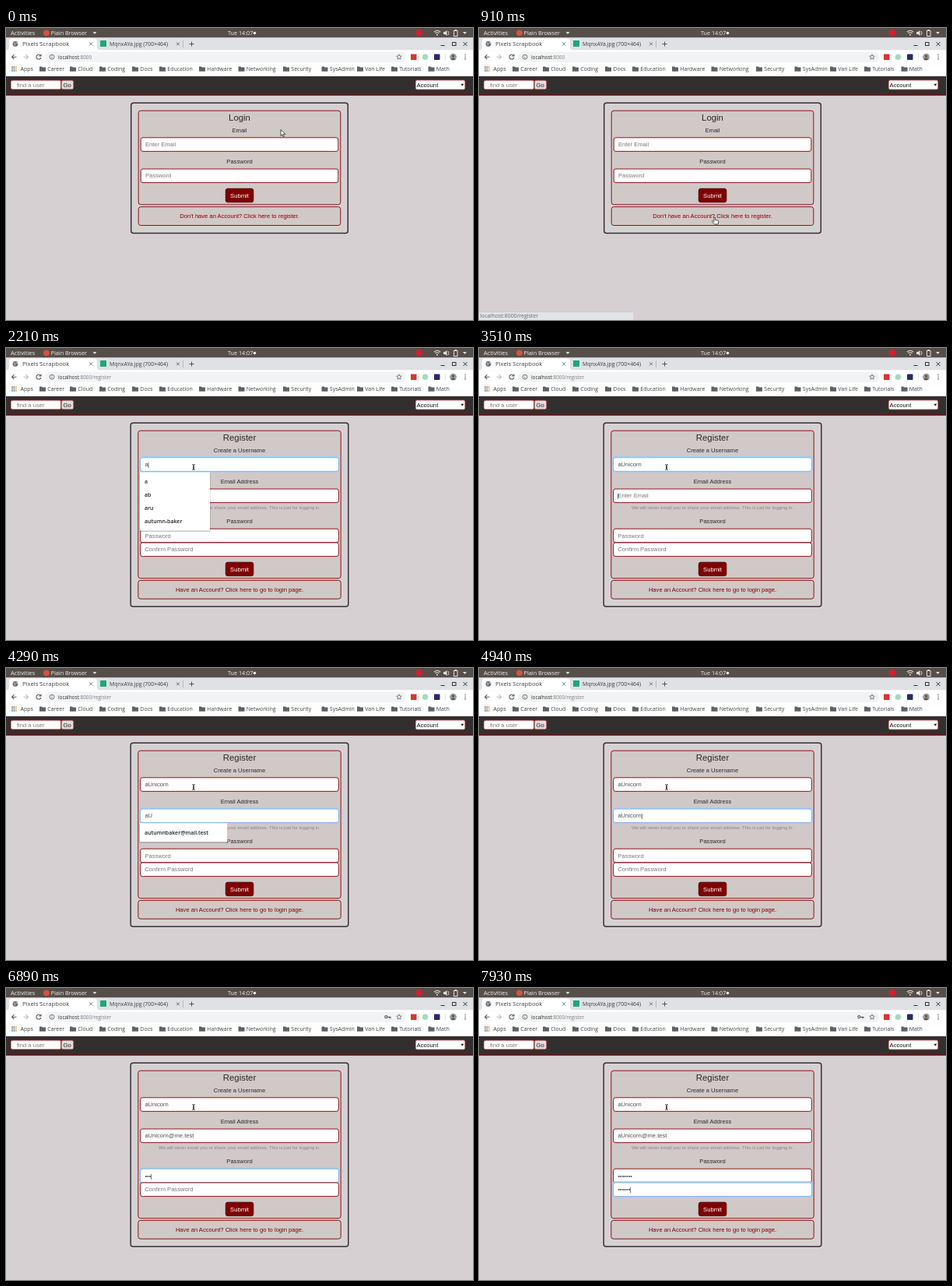
These frames come from a looping animation (600x375 px, 8000 ms). An HTML page:

```html
<!DOCTYPE html>
<html lang="en">
<head>
<meta charset="utf-8">
<title>Registration demo</title>
<style>
  html, body { margin: 0; width: 100%; height: 100%; overflow: hidden; }
  svg { display: block; width: 100vw; height: 100vh; }
  text { font-family: "Liberation Sans", Arial, sans-serif; white-space: pre; }
  .ui { font-family: "Open Sans", "Noto Sans", sans-serif; }
  .bold { font-weight: 600; }
</style>
</head>
<body>
<svg viewBox="0 0 600 375">
  <g id="browser"></g>
  <g id="page"></g>
</svg>
<script>
const LOOP = 8000, STEP = 130;
const RED = '#8c1515', MAROON = '#800000', INK = '#2b2a2c', BODY = '#d7d0d2', PANEL = '#d1c8c8';
const USER = 'aUnicorn', EMAIL = 'aUnicorn@me.test';

const rect = (x, y, w, h, fill, extra = '') =>
  `<rect x="${x}" y="${y}" width="${w}" height="${h}" fill="${fill}" ${extra}/>`;
const circle = (x, y, r, fill, extra = '') =>
  `<circle cx="${x}" cy="${y}" r="${r}" fill="${fill}" ${extra}/>`;
const path = (d, stroke, width = 1, fill = 'none') =>
  `<path d="${d}" stroke="${stroke}" stroke-width="${width}" fill="${fill}"/>`;
const text = (x, y, size, content, fill = INK, extra = '') =>
  `<text x="${x}" y="${y}" font-size="${size}" fill="${fill}" ${extra}>${content}</text>`;
const ui = (x, y, size, content, fill = INK) => text(x, y, size, content, fill, 'class="ui"');
const centered = (y, size, content, fill) => text(300, y, size, content, fill, 'text-anchor="middle"');
const outline = (x, y, w, h, stroke, fill, width = 1, r = 3) =>
  rect(x, y, w, h, fill, `rx="${r}" stroke="${stroke}" stroke-width="${width}"`);

function systemBar() {
  return rect(0, 0, 600, 12.5, '#564f49') +
    ui(6, 9, 7.6, 'Activities', '#eee') +
    circle(52, 6.3, 3.9, '#d9503f') + ui(57.5, 9, 7.3, 'Plain Browser', '#eee') +
    path('M111.5 5h5l-2.5 3z', 'none', 0, '#ddd') +
    ui(285, 9, 7.2, 'Tue 14:07', '#eee') + circle(319.5, 6.5, 1.8, '#eee') +
    circle(531, 6.2, 4.4, '#d3202a') +
    path('M550 5q4-3.5 8 0M551.5 6.8q2.500-2 5 0', '#ddd', 1.1) + circle(554, 8.8, 1, '#ddd') +
    path('M562 5h2l2.500-2v7l-2.500-2h-2z', 'none', 0, '#ddd') + path('M568 4q2 2.500 0 5', '#ddd', .9) +
    rect(575.5, 3.5, 4.5, 7, 'none', 'stroke="#ddd"') + rect(576.5, 2, 2.5, 1.2, '#ddd') +
    path('M587 5h5l-2.500 3z', 'none', 0, '#ddd');
}

function tabStrip() {
  return rect(0, 12.5, 600, 16, '#dfe1e5') +
    path('M0 28.500q4 0 4-4v-7q0-4 4-4h105q4 0 4 4v7q0 4 4 4z', 'none', 0, '#fff') +
    circle(12, 20.4, 3.4, '#6b6e72') + path('M9.500 19l2.500 1-1 2.500M13 18l1 2 1-1', '#d8d8d8', .8) +
    ui(21, 23, 7.7, 'Pixels Scrapbook', '#3c4043') +
    path('M107 18.400l4 4m0-4l-4 4', '#5f6368', .9) +
    rect(121, 16, 8, 8, '#1fa679') +
    ui(133, 23, 6.95, 'MqnxAYa.jpg (700×464)', '#3c4043') +
    path('M219 18.400l4 4m0-4l-4 4', '#5f6368', .9) +
    path('M227.500 16v9', '#9a9da1', .6) + path('M235.500 20.500h6m-3-3v6', '#505357', 1) +
    path('M558.500 22.500h5M587.500 18l5 5m0-5l-5 5', '#333', 1) +
    rect(573.5, 18.5, 4.5, 4, 'none', 'stroke="#333"');
}

function toolbar() {
  const folders = [['Career', 43], ['Cloud', 82], ['Coding', 120], ['Docs', 162], ['Education', 197],
    ['Hardware', 248], ['Networking', 298.5], ['Security', 356], ['SysAdmin', 405.500],
    ['Van Life', 451], ['Tutorials', 495], ['Math', 542.500]];
  const dotColors = ['#e2574c', '#e2574c', '#f0b429', '#48a860', '#4a86e8', '#f0b429', '#48a860', '#4a86e8', '#f0b429'];
  const star = Array.from({ length: 10 }, (_, i) => {
    const a = -Math.PI / 2 + i * Math.PI / 5, r = i % 2 ? 1.6 : 3.5;
    return `${505 + r * Math.cos(a)} ${37.3 + r * Math.sin(a)}`;
  }).join('L');
  return rect(0, 28.5, 600, 33.5, '#fff') +
    path('M13.500 37.200h-6m3-3l-3 3 3 3', '#55585c', 1.1) +
    path('M22.500 37.200h6m-3-3l3 3-3 3', '#bbbdc0', 1.1) +
    path('M44.500 35.500a3 3 0 1 0 .4 2.500M45 33.500v2.500h-2.500', '#55585c', 1.1) +
    rect(50, 30.5, 464, 13.5, '#f1f3f4', 'rx="6.7"') +
    circle(59, 37.2, 3, 'none', 'stroke="#6b6e72" stroke-width=".9"') +
    path('M59 36.800v2M59 35.200v.8', '#6b6e72', .9) +
    path(`M${star}Z`, '#5f6368', .8) +
    rect(520, 33.5, 7.5, 7.5, '#d5372f') + circle(538.5, 37.2, 3.8, '#a9d8bd') +
    rect(550, 33.5, 7.5, 7.5, '#2b2860', 'rx="1"') + path('M564.500 33v9', '#ccc', .6) +
    circle(574.5, 37.2, 4.4, '#92a0a8') + circle(574.5, 36, 1.7, '#6d5147') +
    path('M571.500 40.300q3-4 6 0q-3 2-6 0', 'none', 0, '#6d5147') +
    [34.5, 37.2, 39.9].map(y => circle(590, y, .8, '#55585c')).join('') +
    dotColors.map((c, i) => rect(7.2 + i % 3 * 2.4, 49.3 + Math.floor(i / 3) * 2.4, 1.7, 1.7, c)).join('') +
    ui(18.5, 55.2, 7, 'Apps', '#3c4043') +
    folders.map(([name, x]) =>
      path(`M${x} 49.500h3l1 1h4v5.300h-8z`, 'none', 0, '#5f6368') + ui(x + 10.3, 55.2, 7, name, '#3c4043')).join('');
}

function navbar() {
  return rect(0, 62, 600, 313, BODY) + rect(0, 62, 600, 24, '#342f2f') + rect(0, 85.5, 600, 1.3, MAROON) +
    outline(6, 67, 65, 12, RED, '#fff', 1, 2) + text(14, 75.6, 7.6, 'find a user', '#7b7b7f') +
    outline(71, 67, 16, 12, RED, '#dedcde', 1, 2) + text(73.5, 75.8, 7.8, 'Go') +
    outline(526, 66.8, 64, 12.4, RED, '#fff', 1, 2) + text(527.5, 75.6, 7.7, 'Account', '#111') +
    path('M584.300 71.800h4l-2 2.800z', 'none', 0, '#111');
}

const submitButton = y =>
  outline(282.3, y, 35.5, 17.5, '#4c0707', MAROON, 1, 2.5) + centered(y + 11.7, 7.7, 'Submit', '#fff');

// value: typed text; underlined: spell-check mark beneath it
function field(x, y, placeholder, { value = '', focused, caret, underlined } = {}) {
  const w = 600 - 2 * x;
  const bar = caret ? '<tspan fill="#222" dx="-.6">|</tspan>' : '';
  const glow = focused ? outline(x - .5, y - .5, w + 1, 18.5, '#a9cdf0', 'none', 2.6, 3.5) : '';
  const label = value
    ? text(x + 5.7, y + 11.3, 7.6, `<tspan fill="#495057">${value}</tspan>`,
        underlined ? '#d66' : INK, underlined ? 'text-decoration="underline"' : '').replace('</text>', bar + '</text>')
    : text(x + 5.7, y + 11.3, 7.6, (bar && '<tspan fill="#222" dx="-1">|</tspan><tspan dx="-1">') + placeholder + (bar && '</tspan>'), '#737980');
  return glow + outline(x, y, w, 17.6, focused ? '#80b5ea' : RED, '#fff', 1, 2.5) + label;
}

function suggestions(y, w, h, items) {
  return rect(171.5, y + .8, w + 1, h + .7, '#000', 'opacity=".22" rx="1"') + rect(172, y, w, h, '#fff') +
    items.map((item, i) => text(178, y + 14.4 + i * 17, 7, item, '#222', 'class="ui bold"')).join('');
}

function loginPage() {
  return outline(160.7, 96.2, 278.6, 167.2, '#333', 'none', 1.5) +
    outline(170.2, 106.2, 259.6, 120.6, RED, PANEL) +
    centered(119.3, 11.4, 'Login') + centered(133.6, 7.6, 'Email') +
    field(173.2, 140.8, 'Enter Email') + centered(174, 7.6, 'Password') +
    field(173.2, 181, 'Password') + submitButton(206.3) +
    outline(170.2, 229.7, 259.6, 23.8, RED, PANEL) +
    centered(243.7, 7.6, "Don't have an Account? Click here to register.", MAROON);
}

const keys = {
  user: [2080, 2470, 2600, 2730, 2860, 2990, 3120, 3250],
  email: [3640, 3770, 4420, 4550, 4680, 4810, 4940, 4940, 5200, 5330, 5460, 5720, 5850, 6110, 6240, 6370],
  password: [6630, 6760, 6890, 7020, 7150, 7150, 7280],
  confirm: [7540, 7540, 7670, 7670, 7930, 7930]
};
const focusTimes = { user: 1820, email: 3510, password: 6500, confirm: 7410 };
const order = Object.keys(keys);

function registerPage(t) {
  const active = order.filter(name => t >= focusTimes[name]).pop();
  // The focus ring lags one step behind the caret.
  const ringed = order.filter(name => t >= focusTimes[name] + (name === 'user' ? 0 : STEP)).pop();
  const count = name => keys[name].filter(k => k <= t).length;
  const lastEvent = active && Math.max(focusTimes[active], ...keys[active].filter(k => k <= t));
  const blinkOn = Math.floor((t - lastEvent) / 500) % 2 === 0;
  const state = (name, content) => ({
    value: content.slice(0, count(name)),
    focused: name === ringed,
    caret: name === active && blinkOn,
    underlined: name === 'email' && name === active && count(name) > 8
  });
  const typedUser = count('user'), typedEmail = count('email');
  let out = outline(160.2, 96.2, 279.6, 235.8, '#333', 'none', 1.5) +
    outline(169.8, 106.2, 260.4, 189.6, RED, PANEL) +
    centered(119.3, 11.4, 'Register') + centered(133.6, 7.6, 'Create a Username') +
    field(172.700, 140.8, 'Enter Username', state('user', USER)) + centered(174, 7.6, 'Email Address') +
    field(172.700, 181, 'Enter Email', state('email', EMAIL)) +
    centered(207.2, 6, 'We will never email you or share your email address. This is just for logging in.', '#898287') +
    centered(225.2, 7.6, 'Password') +
    field(172.700, 232.2, 'Password', state('password', '•'.repeat(7))) +
    field(172.700, 250, 'Confirm Password', state('confirm', '•'.repeat(6))) + submitButton(275.2) +
    outline(169.8, 298.4, 260.4, 23.8, RED, PANEL) +
    centered(312.6, 7.6, 'Have an Account? Click here to go to login page.', MAROON);
  if (typedUser === 1) out += suggestions(159.5, 90, 75, ['a', 'ab', 'aru', 'autumn-baker']);
  if (typedUser === 2) out += suggestions(159.5, 90, 24, ['autumn-baker']);
  if (typedEmail === 1 || typedEmail === 2) out += suggestions(199.3, 112.5, 24, ['autumnbaker@mail.test']);
  if (count('password')) {
    out += circle(488.3, 37.2, 1.6, 'none', 'stroke="#55585c" stroke-width="1.1"') + path('M490 37.200h4v1.800m-1.500-1.800v1.500', '#55585c', 1.1);
  }
  return out;
}

const shapes = {
  arrow: path('M0 0v8l1.900-1.700 1.300 2.900 1.300-.6-1.300-2.800h2.600z', '#222', .8, '#fff'),
  hand: path('M-1 0q1-1 1.700 0v3l3.300.8q1 .4.8 1.500l-.8 3.200h-4.500l-3-3.300q0-1.300 1.300-.9l1.200.8z', '#222', .8, '#fff'),
  beam: path('M-1.800-3.400q1.800 0 1.800.8v5.200q0 .8-1.800.8M1.800-3.400q-1.800 0-1.800.8v5.200q0 .8 1.800.8M-1 .8h2', '#222', .9)
};
const progress = (t, from, to) => {
  const p = Math.min(1, Math.max(0, (t - from) / (to - from)));
  return p * p * (3 - 2 * p);
};

function pointer(t) {
  const down = progress(t, 0, 910), up = progress(t, 1300, 1820);
  const x = 353 - 50 * down - 62 * up, y = 130.5 + 113 * down - 90.500 * up;
  const overLink = t < 1300 && y > 235;
  const overField = t > 1300 && y < 159;
  return { overLink, svg: `<g transform="translate(${x} ${y})">${shapes[overLink ? 'hand' : overField ? 'beam' : 'arrow']}</g>` };
}

function scene(t) {
  const registering = t >= 1300, cursor = pointer(t);
  let out = registering ? registerPage(t) : loginPage();
  out += ui(67, 39.6, 6.4, `localhost<tspan fill="#7b7f84">:8000${registering ? '/register' : ''}</tspan>`);
  if (cursor.overLink) {
    out += outline(-2, 364.7, 201, 13, '#c3c4c8', '#e3e4e7', .7, 1) + ui(1.5, 372.4, 7, 'localhost:8000/register', '#66696e');
  }
  return out + cursor.svg;
}

document.getElementById('browser').innerHTML = systemBar() + tabStrip() + toolbar() + navbar();
const page = document.getElementById('page');
let shown = -1;

function draw() {
  const t = Math.floor(performance.now() % LOOP / STEP) * STEP;
  if (t !== shown) page.innerHTML = scene(shown = t);
  requestAnimationFrame(draw);
}
draw();
</script>
</body>
</html>
```
